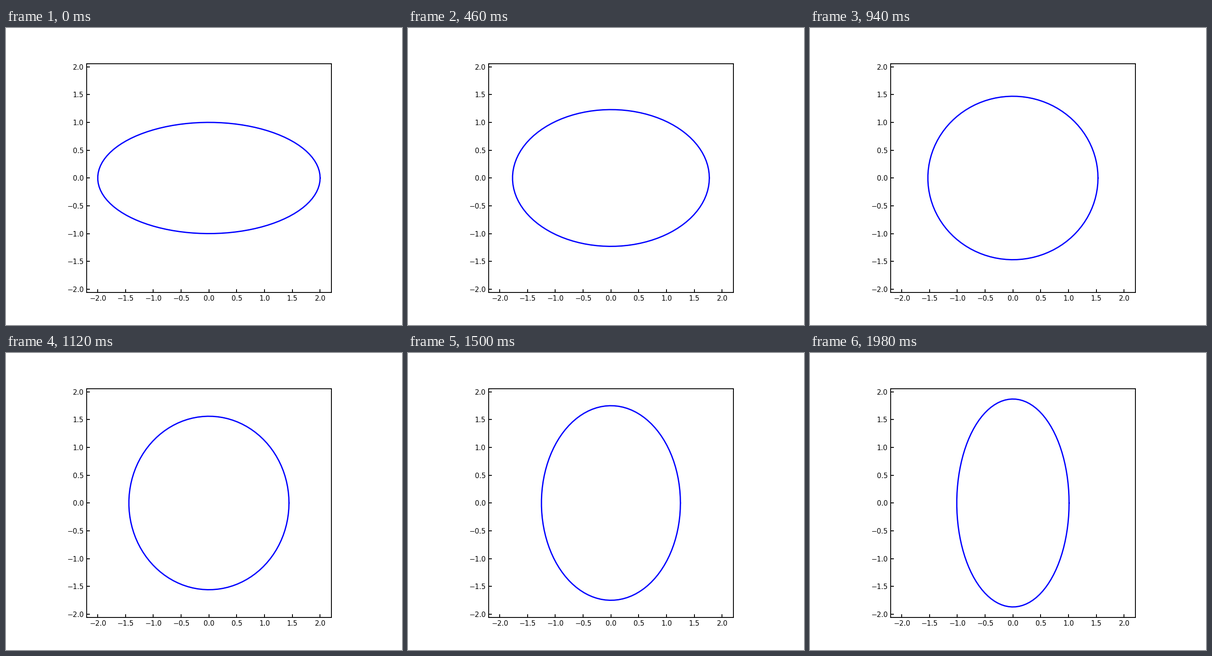
These frames come from a looping animation (864x648 px, 2 s). A matplotlib script:

```python
import matplotlib.pyplot as plt
import numpy as np
from matplotlib.animation import FuncAnimation

FRAMES = 100
INTERVAL = 20  # ms
STEP = 0.01
MAX_B = 1.87

plt.rcParams.update({
    "font.family": "DejaVu Sans",
    "font.size": 8,
    "axes.linewidth": 1.0,
    "lines.linewidth": 1.5,
})
for axis in ("xtick", "ytick"):
    plt.rcParams.update({
        f"{axis}.direction": "in",
        f"{axis}.labelsize": 8,
        f"{axis}.major.size": 3.5,
        f"{axis}.major.width": 1.0,
        f"{axis}.major.pad": 3.5,
    })

theta = np.linspace(0, 2 * np.pi, 100)


def ellipse(i):
    """Width shrinks steadily while height grows up to its limit."""
    a = 2 - STEP * i
    b = min(1 + STEP * i, MAX_B)
    return a * np.cos(theta), b * np.sin(theta)


fig, ax = plt.subplots(figsize=(6.4, 4.8), dpi=135)
ax.set_aspect("equal")
line, = ax.plot(*ellipse(0), color="blue")

# Fit the view to the widest and the tallest ellipse.
ax.update_datalim(np.column_stack(ellipse(FRAMES - 1)))
ax.autoscale_view()
ax.autoscale(False)
ticks = np.arange(-2, 2.1, 0.5)
ax.set_xticks(ticks)
ax.set_yticks(ticks)


def update(i):
    line.set_data(*ellipse(i))
    return line,


anim = FuncAnimation(fig, update, frames=FRAMES, interval=INTERVAL,
                     repeat=True, repeat_delay=0)
plt.show()
```
